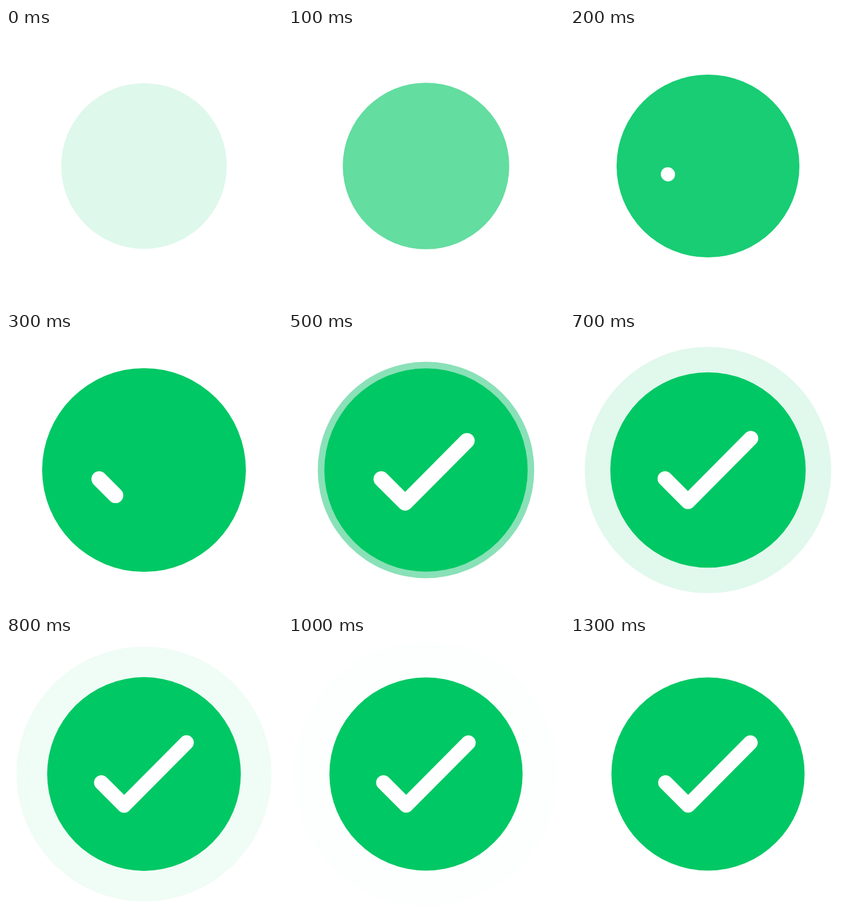
These frames come from a looping animation (450x450 px, 2000 ms). An HTML page:

```html
<!DOCTYPE html>
<html lang="en">
<head>
<meta charset="utf-8">
<title>Success check</title>
<style>
  html, body { margin: 0; width: 100%; height: 100%; overflow: hidden; background: #fff; }
  svg { display: block; width: 100%; height: 100%; }
  circle { fill: #00c864; }
  #ring { fill: #0cc06a; }
  path { fill: none; stroke: #fff; stroke-width: 24; stroke-linecap: round; stroke-linejoin: round; }
</style>
</head>
<body>
<svg viewBox="0 0 450 450">
  <g transform="translate(225 225)">
    <circle id="ring"/>
    <g id="badge">
      <circle r="157.5"/>
      <path id="tick" pathLength="1" d="M-69.3 14 L-32.3 51 L69 -51"/>
    </g>
  </g>
</svg>
<script>
  const LOOP = 2000, STEP = 100;
  const START = 135, PEAK = 171, REST = 157.5;
  const TICK_AT = 200, RING_AT = 500;

  const [ring, badge, tick] = ["ring", "badge", "tick"].map(id => document.getElementById(id));

  const span = (t, from, to) => Math.min(1, Math.max(0, (t - from) / (to - from)));
  const smooth = u => u * u * (3 - 2 * u);
  const easeOut = (u, power) => 1 - (1 - u) ** power;

  function set(node, attrs) {
    for (const name in attrs) node.setAttribute(name, attrs[name]);
  }

  // The disc fades in while it swells, then settles back
  function drawBadge(t) {
    const grow = (PEAK - START) * smooth(span(t, 75, 368));
    const settle = (PEAK - REST) * easeOut(span(t, 400, 900), 2.2);
    set(badge, {
      transform: `scale(${(START + grow - settle) / REST})`,
      opacity: 0.13 + 0.87 * easeOut(span(t, 0, 300), 2)
    });
  }

  function drawTick(t) {
    const progress = Math.max(0.004, smooth(span(t, 210, 540)));
    set(tick, {
      visibility: t < TICK_AT ? "hidden" : "visible",
      "stroke-dasharray": progress < 1 ? `${progress} 2` : "none"
    });
  }

  // The ring slows as it spreads, and its opacity about halves each step
  function drawRing(t) {
    const n = (t - RING_AT) / STEP;
    set(ring, {
      r: 223 - 46.5 * 0.69 ** Math.max(0, n),
      opacity: n < 0 ? 0 : Math.max(0, 0.485 * 0.51 ** n - 0.004)
    });
  }

  function frame() {
    const time = (performance.now() - start) % LOOP;
    const t = Math.floor(time / STEP) * STEP;
    drawBadge(t);
    drawTick(t);
    drawRing(t);
    requestAnimationFrame(frame);
  }

  const start = performance.now();
  frame();
</script>
</body>
</html>
```
